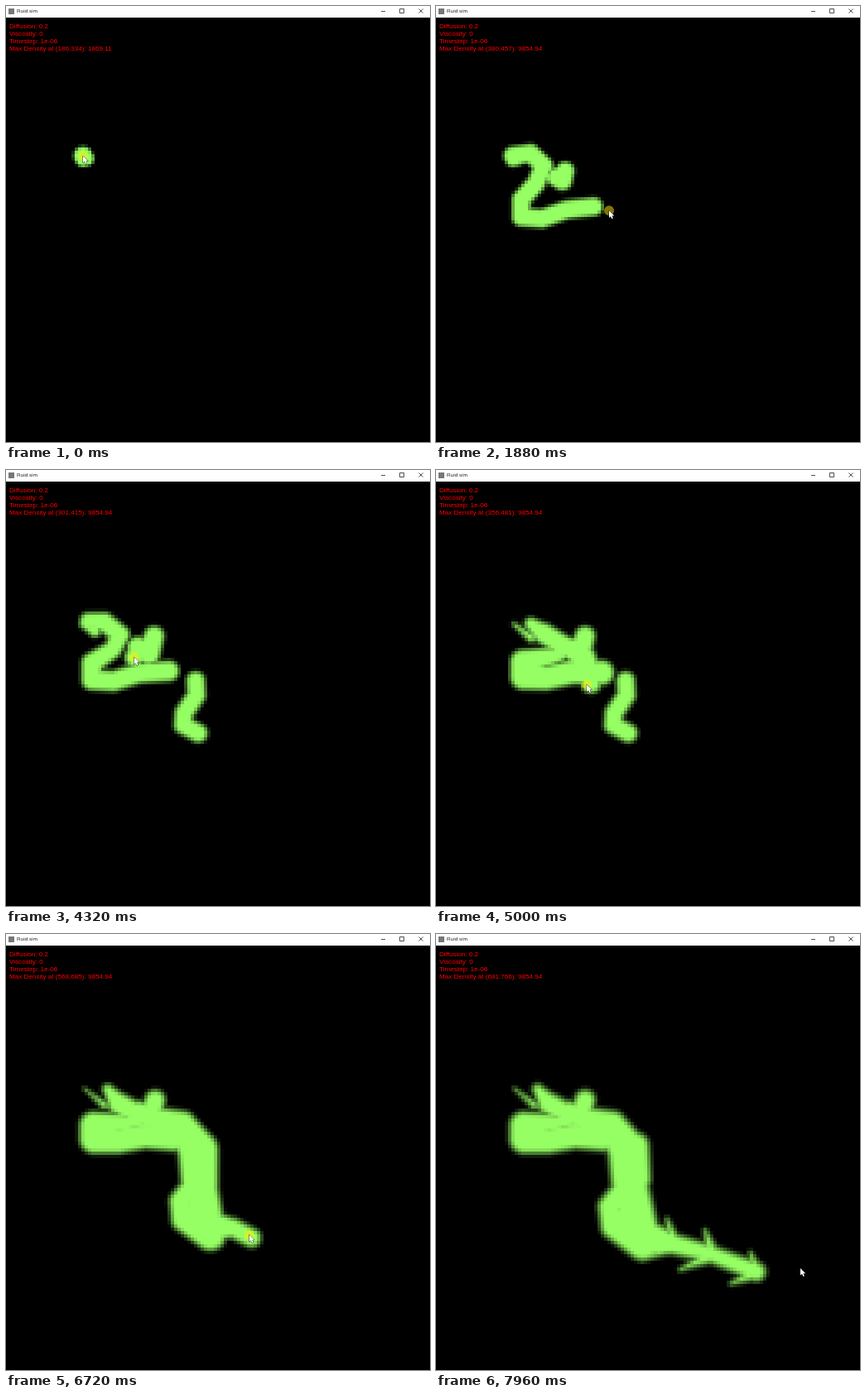
An HTML page with a canvas that plays this animation: 512x527 px, repeating every 8000 ms.

```html
<!DOCTYPE html>
<html lang="en">
<head>
<meta charset="utf-8">
<title>Fluid sim</title>
<style>
  html, body { margin: 0; width: 100%; height: 100%; overflow: hidden; background: #000; }
  canvas { position: absolute; left: 0; top: 0; }
  #title { position: absolute; left: 13px; top: 2px; font: 6px/9px "Open Sans", sans-serif; color: #000; }
  #stats { position: absolute; left: 4px; top: 20px; margin: 0; color: #f00;
           font: 8.1px/9px "Liberation Sans", Arial, sans-serif; }
</style>
</head>
<body>
<canvas id="stage" width="512" height="527"></canvas>
<div id="title">Fluid sim</div>
<pre id="stats"></pre>
<script>
const LOOP = 8000, STEP = 40;
const CELL = 4, FIELD = { left: 71, top: 159, right: 423, bottom: 451 };
const INK_LAG = 100, INK_RADIUS = 11;
const ctx = document.getElementById("stage").getContext("2d");
const stats = document.getElementById("stats");

const clamp = v => Math.max(0, Math.min(1, v));
const mix = (a, b, k) => a + (b - a) * k;
const mixPoint = (a, b, k) => a.map((v, i) => mix(v, b[i], k));
const easeOut = k => 1 - (1 - clamp(k)) ** 2;
const smooth = k => k * k * (3 - 2 * k);
const progress = (t, start, end) => (t - start) / (end - start);

// Pointer gestures, each walked through its points at an even pace.
const loopGesture = { start: 0, end: 1810, points: [
  [93, 181], [114, 178], [130, 193], [121, 214], [103, 234], [103, 255], [128, 257], [158, 246], [195, 242]] };
const hookGesture = { start: 1980, end: 2860, points: [
  [229, 255], [230, 272], [215, 294], [214, 308], [232, 318]] };
const dragGesture = { start: 3240, end: 7200, points: [
  [93, 182], [151, 222], [191, 270], [244, 328], [340.5, 397]] };
const leaveGesture = { start: 7560, end: 7960, points: [[411, 408], [440, 404]] };
const gestures = [loopGesture, hookGesture, dragGesture, leaveGesture];

// Where laid ink (x, y, radius) comes to rest once the drag has pushed it.
const loopRest = [
  [123, 188, 6], [136, 205, 13], [165, 221, 13], [157, 227, 9], [106, 232, 17],
  [107, 247, 18], [135, 249, 16], [168, 243, 16], [202, 246, 16]];
const hookRest = [[240, 257, 17], [242, 295, 17], [210, 330, 14], [216, 352, 17], [250, 374, 20]];
const riverRest = [
  [185, 228, 18], [212, 232, 18], [232, 262, 24], [235, 310, 22],
  [246, 365, 24], [288, 375, 12], [335, 388, 10], [402, 412, 11]];
const RIVER = { start: 4320, gap: 420, settle: 1400, firstPlume: 5 };

function along(points, k) {
  const at = clamp(k) * (points.length - 1);
  const i = Math.min(points.length - 2, Math.floor(at));
  return mixPoint(points[i], points[i + 1], at - i);
}

function pointer(t) {
  let previous = gestures[0];
  for (const g of gestures) {
    if (t < g.start) return mixPoint(previous.points.at(-1), g.points[0], progress(t, previous.end, g.start));
    if (t <= g.end) return along(g.points, progress(t, g.start, g.end));
    previous = g;
  }
  return previous.points.at(-1);
}

// Joins points into tapered segments, as far as `painted` points.
function chain(points, painted = points.length - 1) {
  const out = [];
  for (let i = 0; i < points.length - 1 && i <= painted; i++) {
    const [x, y, r] = points[i];
    const [x2, y2, r2] = mixPoint(points[i], points[i + 1], clamp(painted - i));
    const dx = x2 - x, dy = y2 - y;
    out.push({ x, y, r, dx, dy, dr: r2 - r, len2: dx * dx + dy * dy || 1 });
  }
  return out;
}

function gestureInk(g, rest, t, pushStart, pushEnd) {
  if (t < g.start) return [];
  const push = easeOut(progress(t, pushStart, pushEnd));
  const points = g.points.map((p, i) => mixPoint([...p, INK_RADIUS], rest[i], push));
  return chain(points, Math.max(0, progress(t - INK_LAG, g.start, g.end) * (points.length - 1)));
}

// Ink that keeps its momentum after the first bend.
function lobe(t) {
  if (t < 500) return [];
  const k = easeOut(progress(t, 500, 5000));
  return chain([[160, 215, 13], [173, 222, 14], [180, 201, 12]]
    .map(end => mixPoint([130, 198, 10], end, k)));
}

function finger(t) {
  const k = easeOut(progress(t, 3700, 6000));
  return chain([mixPoint([93, 185, 9], [95, 187, 0], k), mixPoint([97, 184, 9], [119, 207, 4], k)]);
}

// Ink picked up by the drag: it starts under the pointer, widens and settles,
// and sheds plumes to both sides near its end.
function river(t) {
  if (t < RIVER.start) return [];
  const plumes = [];
  const points = riverRest.map((rest, i) => {
    const laidAt = RIVER.start + i * RIVER.gap;
    const k = easeOut((t - laidAt) / RIVER.settle);
    const laid = pointer(Math.min(laidAt, dragGesture.end));
    const p = mixPoint([...laid, INK_RADIUS], rest, k);
    if (i >= RIVER.firstPlume && t > laidAt) {
      for (const [dx, dy] of [[-9, -30], [-40, 19]]) {
        plumes.push(...chain([[p[0], p[1], 9], [p[0] + dx * k, p[1] + dy * k, 1]]));
      }
    }
    return p;
  });
  return [...chain(points, (t - RIVER.start) / RIVER.gap), ...plumes];
}

// Greatest depth of a place inside any segment; negative outside.
function depth(segments, x, y) {
  let best = -99;
  for (const s of segments) {
    const px = x - s.x, py = y - s.y;
    const k = clamp((px * s.dx + py * s.dy) / s.len2);
    best = Math.max(best, s.r + s.dr * k - Math.hypot(px - s.dx * k, py - s.dy * k));
  }
  return best;
}

function drawFluid(t) {
  const ink = [
    ...gestureInk(loopGesture, loopRest, t, 4100, 6000),
    ...gestureInk(hookGesture, hookRest, t, 5000, 8000),
    ...finger(t), ...lobe(t), ...river(t),
  ];
  const soft = mix(7, 14, t / LOOP);
  for (let y = FIELD.top; y < FIELD.bottom; y += CELL) {
    for (let x = FIELD.left; x < FIELD.right; x += CELL) {
      const v = smooth(clamp(depth(ink, x + CELL / 2, y + CELL / 2) / soft + 0.5));
      if (v < 0.02) continue;
      ctx.fillStyle = `rgb(${150 * v}, ${255 * v}, ${100 * v})`;
      ctx.fillRect(x, y, CELL, CELL);
    }
  }
}

function drawPointer(t) {
  const [x, y] = pointer(t);
  ctx.save();
  ctx.translate(x, y);
  if (t < hookGesture.end || (t > dragGesture.start && t < dragGesture.end)) {
    ctx.fillStyle = "rgba(255, 235, 0, 0.5)";
    ctx.beginPath();
    ctx.arc(0, 0, 6, 0, 7);
    ctx.fill();
  }
  const arrow = new Path2D("M0 0V8.6L2 6.8L3.4 9.9L4.8 9.2L3.5 6.2H6.2Z");
  ctx.lineWidth = 0.8;
  ctx.strokeStyle = "#000";
  ctx.stroke(arrow);
  ctx.fillStyle = "#fff";
  ctx.fill(arrow);
  ctx.restore();
}

function drawTitleBar() {
  ctx.fillStyle = "#fff";
  ctx.fillRect(0, 0, 512, 14);
  ctx.fillStyle = "#777";
  ctx.fillRect(3, 3, 7, 7);
  ctx.strokeStyle = "#222";
  ctx.lineWidth = 0.8;
  ctx.stroke(new Path2D("M453 6.5h5M475.5 3.5h5v5h-5zM498.5 3.5l5 5m0-5l-5 5"));
}

function showStats(t) {
  const [x, y] = pointer(Math.max(0, Math.min(t - INK_LAG, dragGesture.end)));
  const density = mix(1869.11, 9854.94, clamp(t / 400)).toFixed(2);
  stats.textContent = "Diffusion: 0.2\nViscosity: 0\nTimestep: 1e-06\n" +
    `Max Density at (${Math.round(2 * x)},${Math.round(2 * (y - 14))}): ${density}`;
}

const start = performance.now();
let shown = -1;
function tick() {
  const t = Math.floor((performance.now() - start) % LOOP / STEP) * STEP;
  if (t !== shown) {
    shown = t;
    ctx.fillStyle = "#000";
    ctx.fillRect(0, 0, 512, 527);
    drawTitleBar();
    drawFluid(t);
    drawPointer(t);
    showStats(t);
  }
  requestAnimationFrame(tick);
}
tick();
</script>
</body>
</html>
```
